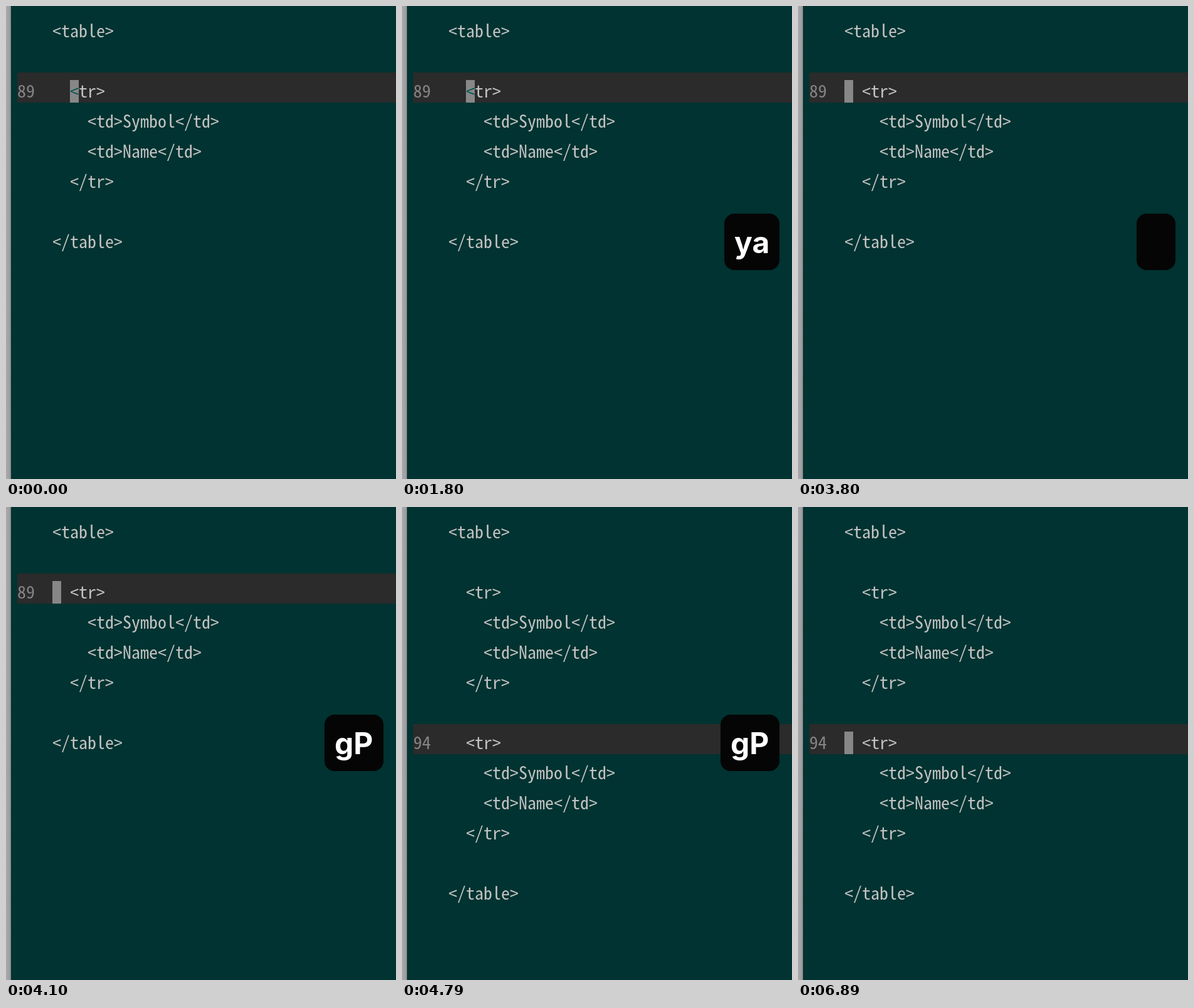
These frames come from a looping animation (622x754 px, 8.99 s). An HTML page:

```html
<!DOCTYPE html>
<html lang="en">
<head>
<meta charset="utf-8">
<title>Copy and paste a paragraph</title>
<style>
  html, body { margin: 0; width: 100%; height: 100%; overflow: hidden; background: #003331; }
  svg { display: block; width: 622px; height: 754px; }
  #code text { white-space: pre; font-family: "Noto Sans Mono CJK JP", "Noto Sans Mono CJK SC", "Noto Sans Mono", monospace; }
  #key text { font: 700 48px Inter, "Liberation Sans", sans-serif; }
</style>
</head>
<body>
<svg viewBox="0 0 622 754">
  <defs>
    <linearGradient id="edge">
      <stop offset="0" stop-color="#aaa8ab"/>
      <stop offset=".7" stop-color="#a09ea1"/>
      <stop offset="1" stop-color="#858588"/>
    </linearGradient>
  </defs>
  <rect width="622" height="754" fill="#003331"/>
  <rect width="8" height="754" fill="url(#edge)"/>
  <g id="code">
    <rect id="line" x="18" width="604" height="48" fill="#2b2b2b"/>
    <rect id="cursor" width="14" height="36" fill="#878787"/>
    <text id="number" x="18" fill="#858585"></text>
    <g id="rows" fill="#c2c2c2"></g>
    <text id="under" fill="#00514d">&lt;</text>
  </g>
  <g id="key">
    <rect id="keyBox" y="331" height="90" rx="16"/>
    <text id="keyShade" y="396" opacity=".6"></text>
    <text id="keyText" y="394"></text>
  </g>
</svg>
<script>
const LOOP = 8990, CELL = 14, ROW = 48, LEFT = 74;
const $ = id => document.getElementById(id);
const set = (el, attrs) => { for (const k in attrs) el.setAttribute(k, attrs[k]); };

const block = ["  <tr>", "    <td>Symbol</td>", "    <td>Name</td>", "  </tr>", ""];
const before = ["<table>", "", ...block, "</table>"];
const after = ["<table>", "", ...block, ...block, "</table>"];

// Font size that gives one cell per character.
const pen = document.createElement("canvas").getContext("2d");
pen.font = '100px "Noto Sans Mono CJK JP", "Noto Sans Mono CJK SC", "Noto Sans Mono", monospace';
$("code").style.fontSize = CELL * 100 / pen.measureText("0").width + "px";

// [start, cursor column or -1 when hidden, pasted]
const editor = [
  [0, 2, false], [2100, 0, false], [4690, -1, false], [4790, -1, true], [5690, 0, true]
];

// [start, text, box width, box colour, text colour]
const solid = ["#050505", "#fff"];
const keys = [
  [0, "", 0, ...solid],
  [1600, "y", 60, "#191919", "#888"],
  [1700, "y", 60, ...solid],
  [1800, "ya", 88, ...solid],
  [2000, "yap", 118, ...solid],
  [3800, "", 62, ...solid],
  [3900, "g", 62, ...solid],
  [4000, "g", 94, ...solid],
  [4100, "gP", 94, ...solid],
  [6690, "gP", 94, "#101010", "#b4b4b4"],
  [6790, "gP", 94, "#1f1f1f", "#626262"],
  [6890, "", 0, ...solid]
];

const stepAt = (steps, t) => steps.filter(s => s[0] <= t).pop();
const rowTop = row => 10 + row * ROW;

function drawEditor([, col, pasted]) {
  const y = rowTop(pasted ? 7 : 2), x = LEFT + col * CELL;
  $("rows").replaceChildren(...(pasted ? after : before).map((str, i) => {
    const el = document.createElementNS("http://www.w3.org/2000/svg", "text");
    const code = str.trimStart();
    set(el, { x: LEFT + (str.length - code.length) * CELL, y: rowTop(i) + 40 });
    el.textContent = code;
    return el;
  }));
  set($("line"), { y });
  set($("number"), { y: y + 40 });
  $("number").textContent = pasted ? "94" : "89";
  set($("cursor"), { x, y: y + 12, visibility: col < 0 ? "hidden" : "visible" });
  set($("under"), { x, y: y + 40, visibility: col === 2 ? "visible" : "hidden" });
}

function drawKey([, str, width, box, ink]) {
  const x = 602 - width;
  set($("key"), { visibility: width ? "visible" : "hidden" });
  set($("keyBox"), { x, width, fill: box });
  set($("keyShade"), { x: x + 18 });
  set($("keyText"), { x: x + 16, fill: ink });
  $("keyShade").textContent = $("keyText").textContent = str;
}

let lastEdit, lastKey;
const begin = performance.now();
function draw(now) {
  const t = Math.max(0, now - begin) % LOOP;
  const edit = stepAt(editor, t), press = stepAt(keys, t);
  if (edit !== lastEdit) drawEditor(lastEdit = edit);
  if (press !== lastKey) drawKey(lastKey = press);
  requestAnimationFrame(draw);
}
draw(begin);
</script>
</body>
</html>
```
